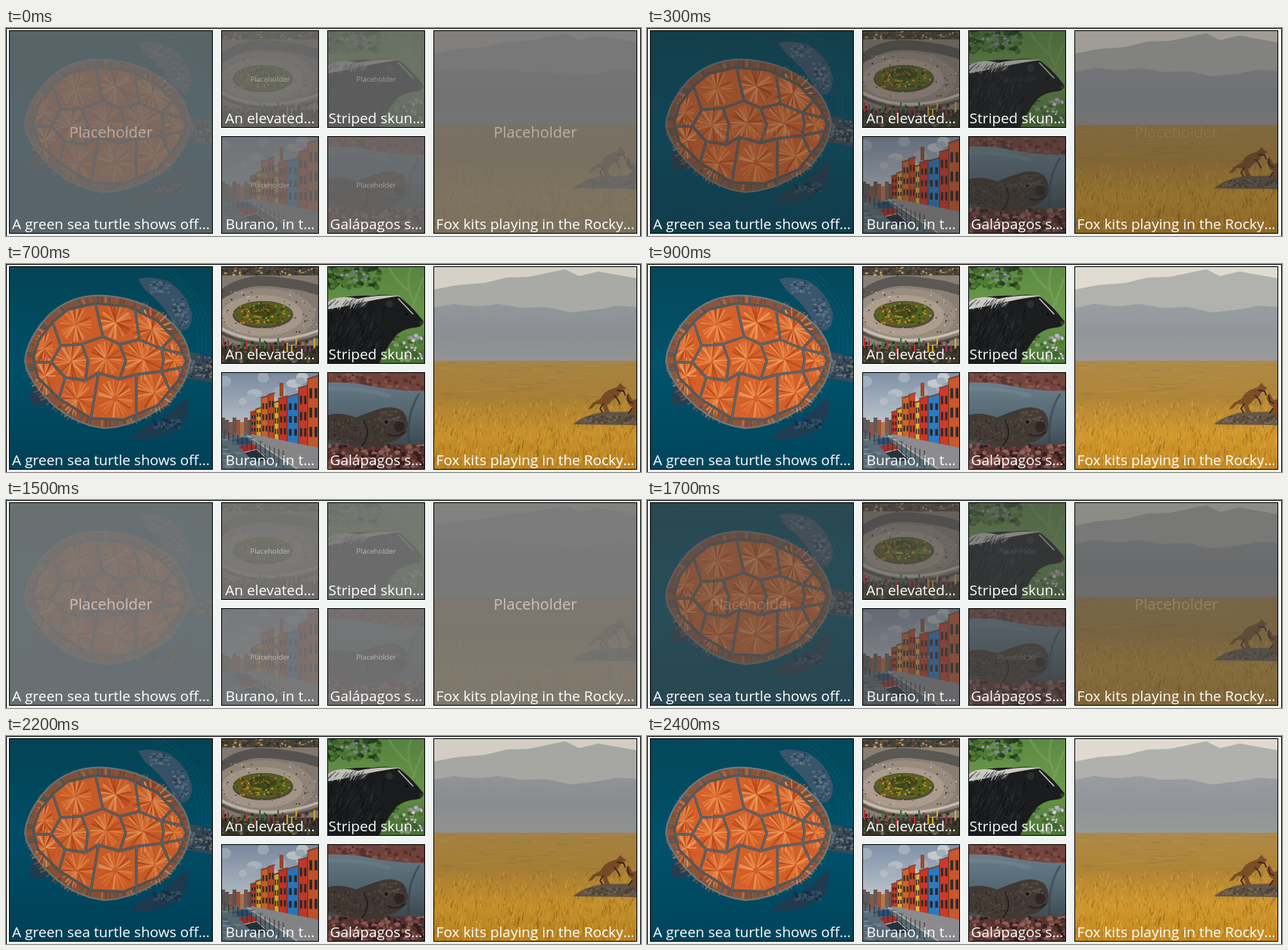
An HTML page that plays this animation: 838x275 px, repeating every 3.9 s.

```html
<!DOCTYPE html>
<html lang="en">
<head>
<meta charset="utf-8">
<title>Image tiles fading in</title>
<style>
  html, body { margin: 0; width: 100%; height: 100%; overflow: hidden; background: #f0f4f3; }
  svg { display: block; width: 838px; height: 275px; }
  text { font-family: "Open Sans", "Noto Sans", sans-serif; text-anchor: middle; }
</style>
</head>
<body>
<svg id="stage" viewBox="0 0 838 275" xmlns="http://www.w3.org/2000/svg"></svg>
<script>
const LOOP = 3900, STEP = 100, FADE = 1000;
// Each fade is already partly under way when its first step shows.
const FADES = [{ start: 1500, lead: 60 }, { start: 0, lead: 100 }];

let seed = 11;
const random = () => {
  seed = (seed * 1664525 + 1013904223) >>> 0;
  return seed / 4294967296;
};
const between = (a, b) => +(a + (b - a) * random()).toFixed(1);
const pick = list => list[Math.floor(random() * list.length)];
const repeat = (n, draw) => Array.from({ length: n }, (_, i) => draw(i)).join('');

const shape = (d, fill, extra = '') => `<path d="${d}" fill="${fill}" ${extra}/>`;
const line = (d, color, width = 1, extra = '') =>
  `<path d="${d}" fill="none" stroke="${color}" stroke-width="${width}" stroke-linejoin="round" stroke-linecap="round" ${extra}/>`;
const rect = (x, y, w, h, fill) => `<rect x="${x}" y="${y}" width="${w}" height="${h}" fill="${fill}"/>`;
const oval = (cx, cy, rx, ry, fill, extra = '') =>
  `<ellipse cx="${cx}" cy="${cy}" rx="${rx}" ry="${ry}" fill="${fill}" ${extra}/>`;
const gradient = (id, ...stops) => `<linearGradient id="${id}" x2="0" y2="1">${stops.map((c, i) =>
  `<stop offset="${i / (stops.length - 1)}" stop-color="${c}"/>`).join('')}</linearGradient>`;
const specks = (n, x0, y0, x1, y1, colors, size) => repeat(n, () =>
  oval(between(x0, x1), between(y0, y1), between(size * .5, size), between(size * .4, size * .8), pick(colors)));

// Spokes around a centre, between two fractions of its radii.
function spokes(cx, cy, rx, ry, count, from, to, draw) {
  return repeat(count, i => {
    const a = i / count * Math.PI * 2 + between(-.1, .1);
    const at = r => `${(cx + Math.cos(a) * rx * r).toFixed(1)},${(cy + Math.sin(a) * ry * r).toFixed(1)}`;
    return draw(`M${at(from)}L${at(to)}`);
  });
}

function turtle() {
  const seam = '#52595c';
  const shell = 'M25,128Q27,100 56,68Q88,38 133,42Q184,46 219,78Q240,98 243,126Q240,161 209,187Q168,216 129,217Q88,212 56,180Q28,151 25,128Z';
  const scutes = [[92, 80], [145, 77], [193, 86], [50, 112], [86, 129], [132, 125], [181, 126],
    [221, 127], [94, 178], [144, 178], [196, 170], [52, 148]];
  const glow = scutes.map(([x, y]) => {
    const narrow = x < 60 || x > 210;
    return spokes(x, y, narrow ? 14 : 25, 27, 30, between(.05, .2), between(.75, 1), d =>
      line(d, pick(['#f39a58', '#e67a38', '#f7b070', '#a83c18', '#d25a24', '#ee8844']), 2.2, 'opacity=".6"'));
  }).join('');
  const seams = 'M62,78L72,108L60,130L78,150L70,178M72,108L100,106L128,96L150,106L176,100L205,112L237,120M78,150L105,154L122,144L150,152L172,146L205,142L237,136M100,106L108,128L105,154M150,106L158,128L150,152M205,112L208,127L205,142M128,96L118,52M176,100L170,58M122,144L112,204M172,146L172,206M60,130H36M205,112L220,96M205,142L216,166';
  const inner = 'M36,124L43,101L62,76L82,60L118,52L160,56L200,75L228,105L238,128L228,153L200,187L155,206L112,204L70,178L42,150Z';
  return rect(4, 3, 269, 269, 'url(#water)')
    + repeat(4, i => line(`M${190 + i * 8},4Q${262 + i * 5},55 ${252 + i * 6},118`, '#12647a', 1.5, 'opacity=".3"'))
    + shape('M174,20Q190,15 214,23Q238,38 245,64Q247,82 236,88Q222,86 216,70Q206,52 184,35Z', '#3a566c')
    + shape('M237,116Q256,117 273,126V157Q257,153 238,151Z', '#3a4c5a')
    + shape('M239,176Q244,202 226,218Q199,235 164,231Q180,213 205,206Z', '#1f3d52')
    + shape('M39,160Q28,175 33,184Q41,193 59,184Z', '#233f52')
    + specks(70, 190, 23, 216, 38, ['#61788a', '#2a4256', '#4b6579'], 2.2)
    + specks(70, 220, 46, 240, 82, ['#61788a', '#2a4256', '#4b6579'], 2.4)
    + specks(60, 242, 122, 272, 150, ['#63737e', '#22333f', '#7d7770'], 2.2)
    + specks(60, 195, 206, 230, 217, ['#35546a', '#142f42'], 2.4)
    + shape(shell, '#8f5438')
    + spokes(134, 129, 109, 87, 130, .89, .98, d => line(d, pick(['#c87a48', '#6c4636', '#a85a30', '#7a5c4c']), 2.4, 'opacity=".7"'))
    + spokes(134, 129, 109, 87, 26, .88, 1, d => line(d, seam, 2.4))
    + line(shell, '#6f7d80', 2)
    + shape(inner, '#d5622b') + glow
    + line(seams + inner, seam, 3.4)
    + line(seams, '#8f8a80', .8, 'opacity=".55"');
}

function plaza() {
  return rect(284, 3, 129, 129, '#8a7f75')
    + rect(284, 3, 129, 12, '#49443a') + specks(70, 285, 4, 412, 15, ['#c3a161', '#2f352c', '#795b45'], 2.2)
    + line('M284,42Q310,19 351,23T413,35', '#5c5854', 13)
    + repeat(8, i => line(`M${289 + i * 3},${48 - i}l8,3`, '#c9c5bd', 1.2))
    + oval(340, 68, 68, 36, '#9a8d80') + oval(338, 68, 54, 27, '#ac9d8f')
    + oval(339, 67, 40, 18, '#544a35') + oval(339, 66, 38, 16, '#59641f')
    + specks(170, 310, 55, 368, 78, ['#a08a24', '#33491c', '#c08a28', '#8a3a1e', '#4d6420'], 2.2)
    + oval(339, 61, 18, 8, '#3f4a1c') + specks(40, 326, 56, 352, 66, ['#8c7a22', '#2f421a', '#8a4a20'], 2)
    + specks(75, 286, 35, 410, 91, ['#302d2c', '#d0c4b6', '#4b4440'], 1.2)
    + line('M284,85Q340,115 413,88', '#c6beb3', 3.5) + line('M284,91Q340,119 413,96', '#55504a', 4)
    + rect(284, 108, 129, 24, '#3c382c')
    + specks(90, 285, 103, 412, 131, ['#202c20', '#5c573c', '#7a6c5c', '#2b2822'], 3)
    + repeat(22, i => rect(286 + i * 6, 98 + (i % 4) * 3, 2.2, between(8, 15), pick(['#c0302c', '#dba828', '#3e7040', '#8e384b'])));
}

function skunk() {
  return rect(424, 3, 129, 129, 'url(#leaf)')
    + line('M535,3Q525,30 540,52M505,3Q512,20 530,34M550,20L536,58', '#7fa863', 3, 'opacity=".5"')
    + specks(80, 425, 3, 493, 32, ['#2c5026', '#527c35', '#24401f', '#44692f'], 5)
    + specks(12, 434, 7, 480, 25, ['#8b79b5', '#a394c6'], 2.4)
    + specks(45, 508, 96, 552, 131, ['#4f7a3c', '#86a070', '#41682f'], 4)
    + specks(16, 522, 92, 550, 122, ['#c4b8cc', '#d8d2d8', '#a99bbb'], 3)
    + shape('M424,49Q456,40 484,42Q505,38 520,44Q533,54 543,66L551,76Q550,83 540,84Q526,85 516,93Q506,105 499,118L492,132H424Z', '#1b1d1f')
    + repeat(150, () => {
      const x = between(427, 500), y = between(56, 118);
      return line(`M${x},${y}l-3,${between(5, 9)}`, pick(['#0d0f11', '#303335', '#25282a']));
    })
    + shape('M424,50Q440,40 464,46Q490,40 521,42Q500,45 484,48Q458,54 424,60Z', '#cfcdc6')
    + repeat(50, () => line(`M${between(426, 480)},${between(46, 52)}l-5,${between(3, 9)}`, pick(['#b9b8b2', '#4a4b4c'])))
    + line('M518,46L537,66', '#c4c3bd', 1.6) + oval(506, 53, 5, 5, '#2d3033')
    + oval(529, 66, 1.5, 1.5, '#050606') + oval(548, 78, 2.6, 2.4, '#3a3838');
}

function canal() {
  const houses = [
    [323, 196, '#c23a24'], [330, 192, '#e2a32c'], [337, 177, '#d2652a'], [346, 173, '#c8482a'], [354, 183, '#e6b034'],
    [360, 178, '#cf3526'], [371, 176, '#2c7cc2'], [386, 164, '#d03a28'], [398, 152, '#c9582c'], [413]
  ];
  const base = x => 226 + (x - 328) * .2;
  const terrace = houses.slice(0, -1).map(([a, roof, color], i) => {
    const b = houses[i + 1][0], w = b - a, height = base(a) - roof;
    const panes = repeat(3, r => repeat(2, c =>
      rect(a + w * (.16 + c * .46), roof + height * (.14 + r * .29), w * .24, height * .15, '#2b2a2c')));
    return shape(`M${a},${roof}L${b},${roof - w * .3}V${base(b)}L${a},${base(a)}Z`, color)
      + line(`M${a},${roof}L${b},${roof - w * .3}`, '#7d4632', 2) + panes
      + line(`M${a},${roof + 2}V${base(a)}`, '#4c2f28', .8);
  }).join('');
  return rect(284, 143, 129, 129, 'url(#cloud)')
    + specks(16, 286, 150, 401, 188, ['#a3b0be', '#c3c9ce', '#b4bdc6'], 11)
    + rect(284, 219, 129, 53, '#5b6d78')
    + repeat(9, i => rect(284 + i * 5, 203 + (i % 3) * 3, 5, 20, pick(['#85594a', '#b17950', '#5d5a58', '#a2543c'])))
    + terrace + rect(361, 157, 5, 18, '#a04a2c')
    + shape('M325,225L413,243V272H386L319,228Z', '#8c8b8e')
    + line('M319,227L386,272', '#b5b2aa', 2)
    + repeat(60, () => line(`M${between(285, 338)},${between(228, 271)}h${between(3, 10)}`, pick(['#8496a0', '#40545f', '#6c7f8a'])))
    + shape('M301,232l17,-3 7,9 -17,1Z', '#2a4f78') + shape('M307,241l18,-4 10,9 -20,4Z', '#a2322a')
    + shape('M315,250l18,-5 15,14 -20,2Z', '#22343f') + line('M315,249l16,-4 13,12', '#c4c1b6', 1.2)
    + repeat(14, i => line(`M${288 + i * 6},${221 + i * 2}v${9 + i}`, '#2f2e31'));
}

function seaLions() {
  return rect(424, 143, 129, 129, '#74453f')
    + specks(120, 425, 144, 552, 172, ['#5a3532', '#8a564d', '#7b493f'], 4)
    + shape('M424,157Q455,155 490,163Q521,168 553,168V242H424Z', 'url(#hide)')
    + line('M425,165Q465,163 505,174', '#7d919c', 5, 'opacity=".35"')
    + line('M532,242Q527,200 545,172', '#37434b', 3, 'opacity=".6"')
    + rect(424, 239, 129, 33, '#55332f')
    + specks(210, 425, 239, 552, 271, ['#7d4c45', '#351f20', '#96605a', '#5d3934'], 4)
    + shape('M424,200Q440,195 462,203Q478,196 492,192Q510,186 524,195Q533,206 528,223Q516,236 500,238Q482,246 460,241L424,232Z', '#433a35')
    + specks(140, 430, 206, 505, 234, ['#574c43', '#332e2b', '#4b423b'], 2)
    + specks(35, 492, 194, 522, 208, ['#5c5047', '#4d433c'], 2.4)
    + oval(519, 215, 7, 7, '#2d2826') + oval(502, 209, 2.5, 2, '#161718')
    + line('M504,225Q516,231 526,222M472,207Q483,224 470,240', '#282422', 2);
}

function foxes() {
  const fur = '#7d4f27', shade = '#3a271b';
  const grass = repeat(900, () => {
    const y = 183 + 89 * Math.pow(random(), .85);
    return line(`M${between(564, 833)},${y.toFixed(1)}l${between(-2, 3)},${-between(3, 3 + (y - 170) / 9)}`,
      pick(['#e2aa42', '#a06c18', '#d29628', '#84591c', '#e8b850', '#c48422']), .9, 'opacity=".65"');
  });
  return rect(564, 3, 269, 128, 'url(#sky)')
    + shape('M564,34L594,28L632,25L660,18L690,17L738,7L756,16L782,10L833,19V131H564Z', '#b1b1ae')
    + shape('M564,58L590,53L622,56L650,53L681,58L714,57L745,64L782,60L808,55L833,57V131H564Z', 'url(#hill)')
    + rect(564, 128, 269, 144, 'url(#field)')
    + repeat(110, () => line(`M${between(564, 825)},${between(131, 182)}h${between(6, 25)}`, pick(['#c29a50', '#92733c', '#ab8440']), 1, 'opacity=".45"'))
    + grass
    + shape('M748,212Q764,199 787,196L833,195V213Z', '#665746')
    + specks(85, 760, 201, 832, 210, ['#4b4237', '#7c6c58', '#5a4d40'], 2.4)
    + shape('M768,192L775,183L785,178Q788,170 797,166L806,163L811,157L814,161L819,164L812,168L808,175L800,180L797,184L793,187L797,196L790,196L787,186L779,185L773,191Z', fur)
    + line('M788,185L784,191L787,196M803,174L808,180L810,185M807,167L815,168L817,173', shade, 1.8)
    + shape('M833,178L827,180L821,170L818,178L822,186L827,190L820,197L833,199Z', fur)
    + line('M820,174l2,8 5,2M826,191l-4,6', shade, 1.8);
}

const TILES = [
  { x: 4, y: 3, size: 269, caption: 'A green sea turtle shows off…', photo: turtle },
  { x: 284, y: 3, size: 129, caption: 'An elevated…', photo: plaza },
  { x: 424, y: 3, size: 129, caption: 'Striped skun…', photo: skunk },
  { x: 284, y: 143, size: 129, caption: 'Burano, in t…', photo: canal },
  { x: 424, y: 143, size: 129, caption: 'Galápagos s…', photo: seaLions },
  { x: 564, y: 3, size: 269, caption: 'Fox kits playing in the Rocky…', photo: foxes }
];
const each = draw => TILES.map(draw).join('');
const square = ({ x, y, size }, fill) => rect(x, y, size, size, fill);

document.getElementById('stage').innerHTML = `
  <defs>
    ${gradient('water', '#05485a', '#00526c', '#00455c')}
    ${gradient('leaf', '#5c8a44', '#6c9c4c', '#4b7735')}
    ${gradient('cloud', '#7f90a8', '#b9c1ca', '#c0bfba')}
    ${gradient('hide', '#6a7f8b', '#566a75', '#3f4a50')}
    ${gradient('sky', '#e0dbd0', '#e0dbd0')}
    ${gradient('hill', '#9a9da1', '#929599', '#9b9b9a')}
    ${gradient('field', '#ae8a48', '#b08538', '#d0982e', '#c48a22')}
    ${each((t, i) => `<clipPath id="clip${i}">${square(t, '#000')}</clipPath>`)}
  </defs>
  ${rect(0, 0, 838, 275, '#f0f4f3')}
  ${line('M.5,275V.5H837.5V275', '#000')}
  ${each(t => square(t, '#000'))}
  <g id="placeholders">
    ${each(t => square(t, '#868686') + `<text x="${t.x + t.size / 2}" y="${t.y + t.size / 2 + (t.size > 200 ? 7.5 : 3.8)}" font-size="${t.size > 200 ? 20 : 9.5}" fill="#e6e6e6">Placeholder</text>`)}
  </g>
  <g id="photos">${each((t, i) => `<g clip-path="url(#clip${i})">${t.photo()}</g>`)}</g>
  ${each(t => `<rect x="${t.x + .5}" y="${t.y + .5}" width="${t.size - 1}" height="${t.size - 1}" fill="none" stroke="#000"/>
    <text x="${t.x + t.size / 2}" y="${t.y + t.size - 6}" font-size="19" fill="#fff">${t.caption}</text>`)}`;

const photos = document.getElementById('photos');
const placeholders = document.getElementById('placeholders');

function render(time) {
  const t = Math.floor(time % LOOP / STEP) * STEP;
  const fade = FADES.find(f => t >= f.start);
  const progress = Math.min(1, (t - fade.start + fade.lead) / FADE);
  const shown = 1 - (1 - progress) ** 2;
  photos.setAttribute('opacity', shown);
  placeholders.setAttribute('opacity', 1 - shown);
}

const began = performance.now();
function tick() {
  render(performance.now() - began);
  requestAnimationFrame(tick);
}
tick();
</script>
</body>
</html>
```
